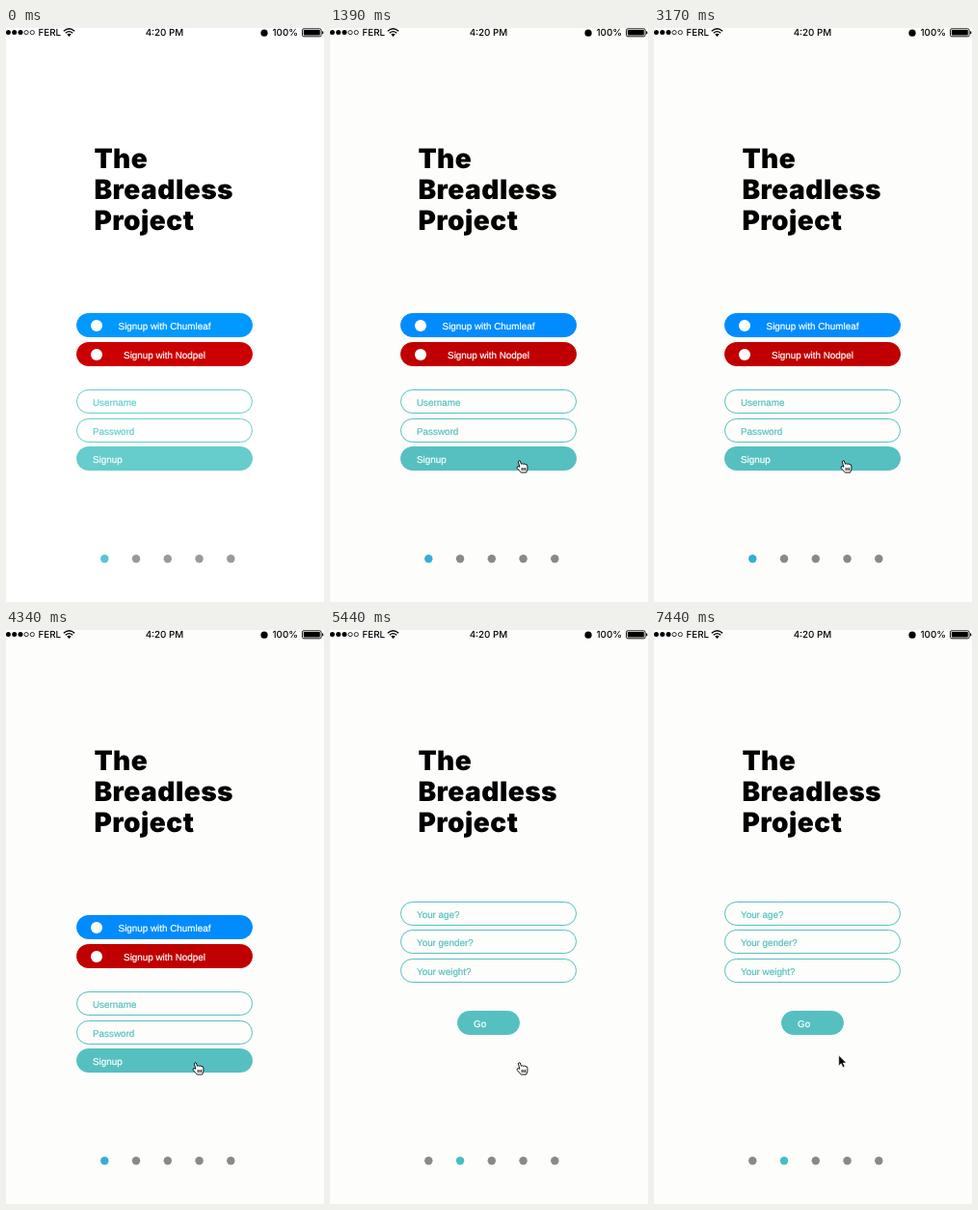
An HTML page for the animation above (8 s loop, 330 px wide and 594 px high).

```html
<!DOCTYPE html>
<html lang="en">
<head>
<meta charset="utf-8">
<title>Signup flow</title>
<style>
html, body { margin: 0; width: 100%; height: 100%; overflow: hidden; }
svg { display: block; width: 100%; height: 100%; background: var(--paper); text-rendering: geometricPrecision; }
.title { font: 900 28px/1 Inter, sans-serif; letter-spacing: .5px; }
.status { font: 500 9.8px Inter, sans-serif; }
.label { font: 9.85px "Liberation Sans", Arial, sans-serif; }
.label text { stroke-width: .2; }
.line { fill: none; stroke: #000; }
</style>
</head>
<body>
<svg viewBox="0 0 330 594">
  <g class="status">
    <circle cx="2.4" cy="4.6" r="2.5"/>
    <circle cx="8.7" cy="4.6" r="2.5"/>
    <circle cx="15" cy="4.6" r="2.5"/>
    <circle class="line" cx="21.1" cy="4.6" r="2.1" stroke-width=".8"/>
    <circle class="line" cx="27.3" cy="4.6" r="2.1" stroke-width=".8"/>
    <text x="33.5" y="8.4">FERL</text>
    <path class="line" stroke-width="1.3" d="M59.8 3.2Q65.5-1.8 71.2 3.2M61.8 5.3Q65.5 2 69.2 5.3"/>
    <path d="M63.3 6.6Q65.5 4.8 67.7 6.6L65.5 8.9Z"/>
    <text x="164.5" y="8.4" text-anchor="middle">4:20 PM</text>
    <circle cx="268" cy="5.2" r="3.6"/>
    <text x="276.5" y="8.4">100%</text>
    <rect class="line" x="307.5" y=".8" width="19.6" height="8" rx="1.4" stroke-width=".9"/>
    <rect x="308.8" y="2.1" width="17" height="5.4" rx=".5"/>
    <rect x="328" y="3.3" width="1.3" height="3" rx=".6"/>
  </g>
  <g class="title">
    <text x="91.4" y="144.6">The</text>
    <text x="91.4" y="176.7">Breadless</text>
    <text x="91.4" y="208.8">Project</text>
  </g>
  <g id="signup" class="label"></g>
  <g id="profile" class="label"></g>
  <g id="dots"></g>
  <path id="arrow" d="M0 0V10.6L2.5 8.3L4.2 12.3L6.1 11.5L4.4 7.6H7.7Z" stroke="#fff" stroke-width=".5"/>
  <path id="hand" transform="translate(193.3 447)" fill="#fff" stroke="#000" stroke-width=".9" stroke-linejoin="round"
    d="M3.6 7.2L2 1.8Q2.4 .2 4 1L5.2 4.3Q6.4 3.3 7.4 4.3Q8.8 3.4 9.6 4.6Q11.4 4.2 11.6 6.2V9.5L10.4 13H5L1 8.6Q.2 6.6 1.8 6.6ZM5.8 8V11M7.6 8V11M9.4 8V11"/>
</svg>
<script>
const LOOP = 8000;
const PROFILE_AT = 4570;
const HAND_AT = 370;
const ARROW_AT = 6900;
const $ = id => document.getElementById(id);

// Each colour settles from a brighter first value.
const palette = {
  paper: [[255, 255, 255], [253, 253, 251]],
  blue: [[0, 153, 255], [0, 140, 255]],
  red: [[204, 0, 0], [192, 0, 0]],
  teal: [[102, 204, 204], [86, 192, 192]],
  dot: [[153, 153, 153], [137, 137, 137]],
  active: [[90, 195, 213], [53, 174, 212]]
};

function pill(y, text, { color = 'teal', outline = false, x = 73, width = 183, textX = 90, anchor = 'start' } = {}) {
  const paint = `var(--${color})`;
  const ink = outline ? paint : '#fff';
  return `<rect x="${x + .5}" y="${y + .5}" width="${width - 1}" height="24" rx="12"
    fill="${outline ? 'none' : paint}" stroke="${paint}"/>
    <text x="${textX}" y="${y + 16.5}" text-anchor="${anchor}" fill="${ink}" stroke="${ink}">${text}</text>`;
}

const field = (y, text) => pill(y, text, { outline: true });
const social = (y, text, color) =>
  pill(y, text, { color, textX: 164.5, anchor: 'middle' }) +
  `<circle cx="94" cy="${y + 13}" r="6" fill="#fff"/>`;

$('signup').innerHTML =
  social(295, 'Signup with Chumleaf', 'blue') +
  social(325, 'Signup with Nodpel', 'red') +
  field(374, 'Username') + field(404, 'Password') + pill(433, 'Signup');

$('profile').innerHTML =
  field(281, 'Your age?') + field(310, 'Your gender?') + field(340, 'Your weight?') +
  pill(394, 'Go', { x: 132, width: 65, textX: 149 });

$('dots').innerHTML = [0, 1, 2, 3, 4]
  .map(i => `<circle cx="${102.3 + i * 32.75}" cy="549.2" r="4.2"/>`).join('');
const dots = [...$('dots').children];

const show = (id, on) => $(id).setAttribute('visibility', on ? 'visible' : 'hidden');

// Number of steps begun, one every 75 ms.
const stepsSince = (time, start, max) =>
  Math.max(0, Math.min(max, Math.floor((time - start) / 75) + 1));

function draw(time) {
  const settle = stepsSince(time, 70, 3) / 3;
  for (const [name, [from, to]] of Object.entries(palette)) {
    const rgb = from.map((v, i) => Math.round(v + (to[i] - v) * settle));
    document.documentElement.style.setProperty('--' + name, `rgb(${rgb})`);
  }

  const page = time < PROFILE_AT ? 0 : 1;
  show('signup', page === 0);
  show('profile', page === 1);
  dots.forEach((dot, i) =>
    dot.setAttribute('fill', i !== page ? 'var(--dot)' : page ? '#46bfc3' : 'var(--active)'));

  show('hand', time >= HAND_AT && time < ARROW_AT);
  show('arrow', time >= ARROW_AT);
  const left = 1 - stepsSince(time, ARROW_AT, 4) / 4;
  $('arrow').setAttribute('transform', `translate(${191.8 + 5 * left} ${440.3 + 6 * left})`);
}

const start = performance.now();
function frame() {
  draw((performance.now() - start) % LOOP);
  requestAnimationFrame(frame);
}
frame();
</script>
</body>
</html>
```
